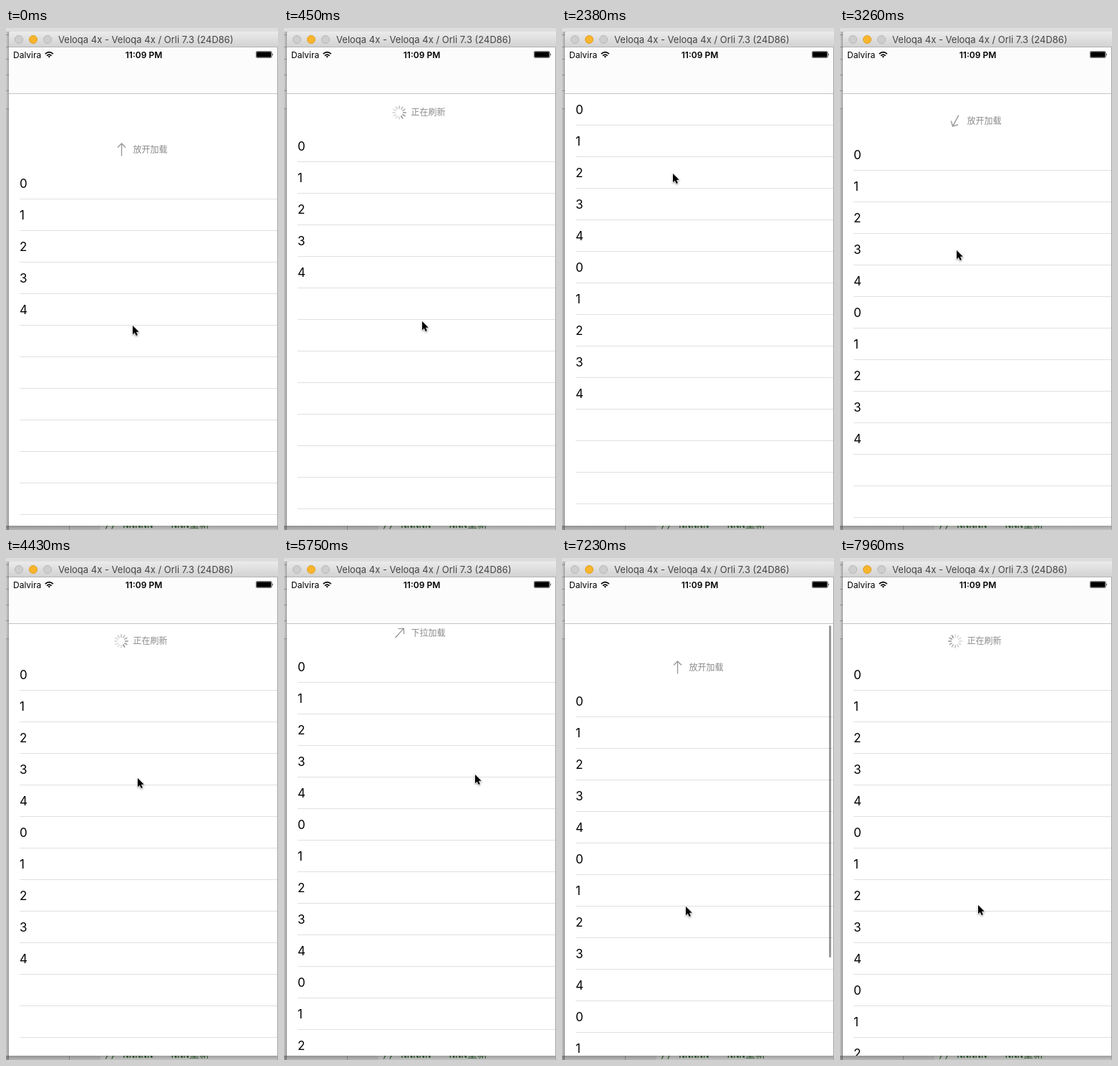
Recreate the animation shown at these times as an HTML page. Size 380x700 px, loop 8000 ms.

```html
<!DOCTYPE html>
<html lang="zh-CN">
<head>
<meta charset="utf-8">
<title>Pull to refresh</title>
<style>
  html, body { margin: 0; width: 100%; height: 100%; overflow: hidden; background: #c4c4c4; }
  svg { display: block; width: 380px; height: 700px; }
  text { font-family: Inter, Roboto, "Liberation Sans", sans-serif; }
  .title { font-size: 13px; fill: #444; }
  .status { font-size: 12px; fill: #000; }
  .clock { font-weight: 600; text-anchor: middle; }
  .digit { font-size: 17px; fill: #000; }
  .hint { font: 12px "Noto Sans CJK SC", "Noto Sans CJK", sans-serif; fill: #8a8a8a; }
  .code { font: 14px "DejaVu Sans Mono", monospace; fill: #2f6b2f; }
  .arrow { fill: none; stroke: #999; stroke-width: 1.4; }
  #cursor { filter: drop-shadow(0 1px 1px rgba(0, 0, 0, .4)); }
</style>
</head>
<body>
<svg viewBox="0 0 380 700">
  <defs>
    <linearGradient id="bar" x2="0" y2="1">
      <stop stop-color="#ebebeb"/><stop offset="1" stop-color="#d1d1d1"/>
    </linearGradient>
    <linearGradient id="shade" x2="0" y2="1">
      <stop stop-color="#000" stop-opacity=".34"/><stop offset="1" stop-color="#000" stop-opacity=".18"/>
    </linearGradient>
    <linearGradient id="side">
      <stop stop-color="#000" stop-opacity=".06"/><stop offset="1" stop-color="#000" stop-opacity=".28"/>
    </linearGradient>
    <clipPath id="view"><rect x="4" y="92" width="375" height="602"/></clipPath>
  </defs>

  <!-- desktop behind the window -->
  <rect width="380" height="700" fill="#dedede"/>
  <rect y="113" width="4" height="587" fill="#d2d2d2"/>
  <path d="M0 9.5H4M0 26.5H4M0 43.5H4M0 65.5H4M0 87.5H4M0 112.5H4M88.5 690V700" stroke="#a8a8a8"/>
  <rect x="132" y="690" width="248" height="10" fill="#eee"/>
  <text class="code" x="138" y="697">// NNNNN - NNN重新</text>
  <rect y="5" width="4" height="695" fill="url(#side)"/>
  <rect y="694" width="380" height="6" fill="url(#shade)"/>
  <rect x="379" y="27" width="1" height="673" fill="#a2a2a2"/>

  <!-- window -->
  <path d="M4 27V10Q4 5 9 5H380V27Z" fill="url(#bar)"/>
  <rect x="4" y="26" width="376" height="1" fill="#b4b4b4"/>
  <g fill="#cecece" stroke="#b8b8b8">
    <circle cx="18" cy="16" r="5.5"/>
    <circle cx="38" cy="16" r="5.5" fill="#fab52e" stroke="#dfa023"/>
    <circle cx="58" cy="16" r="5.5"/>
  </g>
  <text class="title" x="73" y="21">Veloqa 4x - Veloqa 4x / Orli 7.3 (24D86)</text>
  <rect x="4" y="27" width="375" height="667" fill="#fff"/>

  <g clip-path="url(#view)">
    <g id="list">
      <g id="arrow"><path class="arrow" d="M0 9V-8.6M-5.5 -3L0 -8.6L5.5 -3"/></g>
      <g id="spinner" transform="translate(161 67)"></g>
      <text class="hint" id="hint" x="177.5" y="71"></text>
    </g>
    <rect id="thumb" x="373" y="94" width="3" rx="1.5" fill="#000" fill-opacity=".4"/>
  </g>

  <!-- navigation and status bar -->
  <rect x="4" y="27" width="375" height="64" fill="#fcfcfc"/>
  <rect x="4" y="91" width="375" height="1" fill="#c4c4c4"/>
  <text class="status" x="10" y="41.5">Dalvira</text>
  <g fill="none" stroke="#000" stroke-width="1.7">
    <path d="M54.8 36.2Q60.3 31 65.8 36.2M57 38.6Q60.3 35.6 63.6 38.6"/>
    <path d="M58.6 39.7Q60.3 38.4 62 39.7L60.3 41.6Z" fill="#000" stroke="none"/>
  </g>
  <text class="status clock" x="192.5" y="41.5">11:09 PM</text>
  <rect x="349.25" y="32.5" width="22" height="9" rx="1.5" fill="none" stroke="#000" stroke-width=".5"/>
  <rect x="350" y="33.25" width="20.5" height="7.5" rx="1"/>
  <path d="M372 35.2q1.8 1.8 0 3.6z"/>

  <g id="cursor">
    <path d="M0 0V14.2L3.2 11.2L5.5 16.4L8 15.3L5.8 10.3H10.2Z" transform="scale(.86)"
          stroke="#fff" stroke-width="1.4" paint-order="stroke"/>
  </g>
</svg>
<script>
const NS = "http://www.w3.org/2000/svg";
const LOOP = 8000, TICK = 146.96;
const ROW = 44, VIEW = 603, HEADER = 49;
const LOAD = 2000, TURN = 220, SETTLE = 90, FADE = 300;
const $ = id => document.getElementById(id);

// Each pull: finger height at the grab, then the times of grab, arming and release.
const pulls = [
  { y: 189, grab: -900, armed: -400, release: 132 },
  { y: 182, grab: 2500, armed: 3200, release: 3685 },
  { y: 303, grab: 6060, armed: 6727, release: 7300 }
];

// Time, x and y of the turning points of the pointer.
const path = [
  [0, 177, 415], [1200, 219, 398], [2500, 148, 182], [3257, 163, 310],
  [3400, 165, 326], [3685, 165, 326], [4430, 184, 307], [5750, 267, 302],
  [5900, 258, 303], [6060, 258, 303], [6784, 170, 452], [7050, 168, 487], [7960, 193, 484]
];

const clamp = v => Math.min(1, Math.max(0, v));
const ease = v => (1 - Math.cos(Math.PI * clamp(v))) / 2;
const rubber = d => VIEW * (1 - 1 / (1 + .55 * Math.max(0, d) / VIEW));

function add(parent, tag, attrs, text = "") {
  const el = document.createElementNS(NS, tag);
  for (const k in attrs) el.setAttribute(k, attrs[k]);
  el.textContent = text;
  return parent.appendChild(el);
}

function pointer(t) {
  const n = path.findIndex(p => p[0] > t);
  if (n < 0) return path[path.length - 1].slice(1);
  const a = path[n - 1], b = path[n], u = (t - a[0]) / (b[0] - a[0]);
  return [1, 2].map(i => a[i] + (b[i] - a[i]) * u);
}

function pullAt(p, t) {
  const done = p.release + LOAD;
  if (t < p.release) return rubber(pointer(t)[1] - p.y);
  if (t >= done) return HEADER * (1 - ease((t - done) / TURN));
  const top = rubber(pointer(p.release)[1] - p.y);
  return HEADER + (top - HEADER) * Math.exp((p.release - t) / SETTLE);
}

const list = $("list"), digits = [], spokes = [];
for (let r = 0; r < 15; r++) {
  const line = 135 + ROW * r;
  add(list, "rect", { x: 19, y: line, width: 360, height: 1, fill: "#e0e0e0" });
  digits.push(add(list, "text", { class: "digit", x: 19, y: line - 15.3 }, r % 5));
}
for (let s = 0; s < 12; s++) {
  spokes.push(add($("spinner"), "rect", {
    x: -.9, y: -10, width: 1.8, height: 5.2, rx: .9, fill: "#777", transform: `rotate(${s * 30})`
  }));
}

function draw(t) {
  const n = pulls.filter(p => t >= p.grab).length;
  const p = pulls[n - 1], done = p.release + LOAD;
  const pull = Math.round(pullAt(p, t));
  const loading = t >= p.release && t < done;
  const rows = 5 * (t < done ? n : n + 1);

  list.setAttribute("transform", `translate(0 ${pull})`);
  digits.forEach((d, r) => d.style.display = r < rows ? "" : "none");

  $("hint").textContent = loading ? "正在刷新" : t >= p.armed && t < done ? "放开加载" : "下拉加载";
  $("arrow").style.display = loading ? "none" : "";
  $("spinner").style.display = loading ? "" : "none";
  const angle = 180 * (1 + ease((t - p.armed) / TURN) + ease((t - done) / TURN));
  $("arrow").setAttribute("transform", `translate(161.5 66.5) rotate(${angle})`);

  const head = Math.floor(t * 12 / 1000) % 12;
  spokes.forEach((s, i) => {
    const age = (head - i + 12) % 12;
    s.setAttribute("opacity", Math.max(.24, .75 - age * .07));
  });

  const overflow = rows * ROW > VIEW && t < done;
  $("thumb").setAttribute("height", VIEW * VIEW / (rows * ROW) - 2 - pull);
  $("thumb").setAttribute("opacity", overflow ? 1 - clamp((t - p.release) / FADE) : 0);

  const [x, y] = pointer(t).map(Math.round);
  $("cursor").setAttribute("transform", `translate(${x} ${y})`);
}

// The screen updates in steps, slightly slower during the first 1.2 s.
const stepTime = t => t < 1200
  ? Math.floor(t / 150) * 150
  : 1200 + Math.floor((t - 1190) / TICK) * TICK;

const start = performance.now();
let shown = -1;
function frame() {
  const t = stepTime((performance.now() - start) % LOOP);
  if (t !== shown) draw(shown = t);
  requestAnimationFrame(frame);
}
frame();
</script>
</body>
</html>
```
